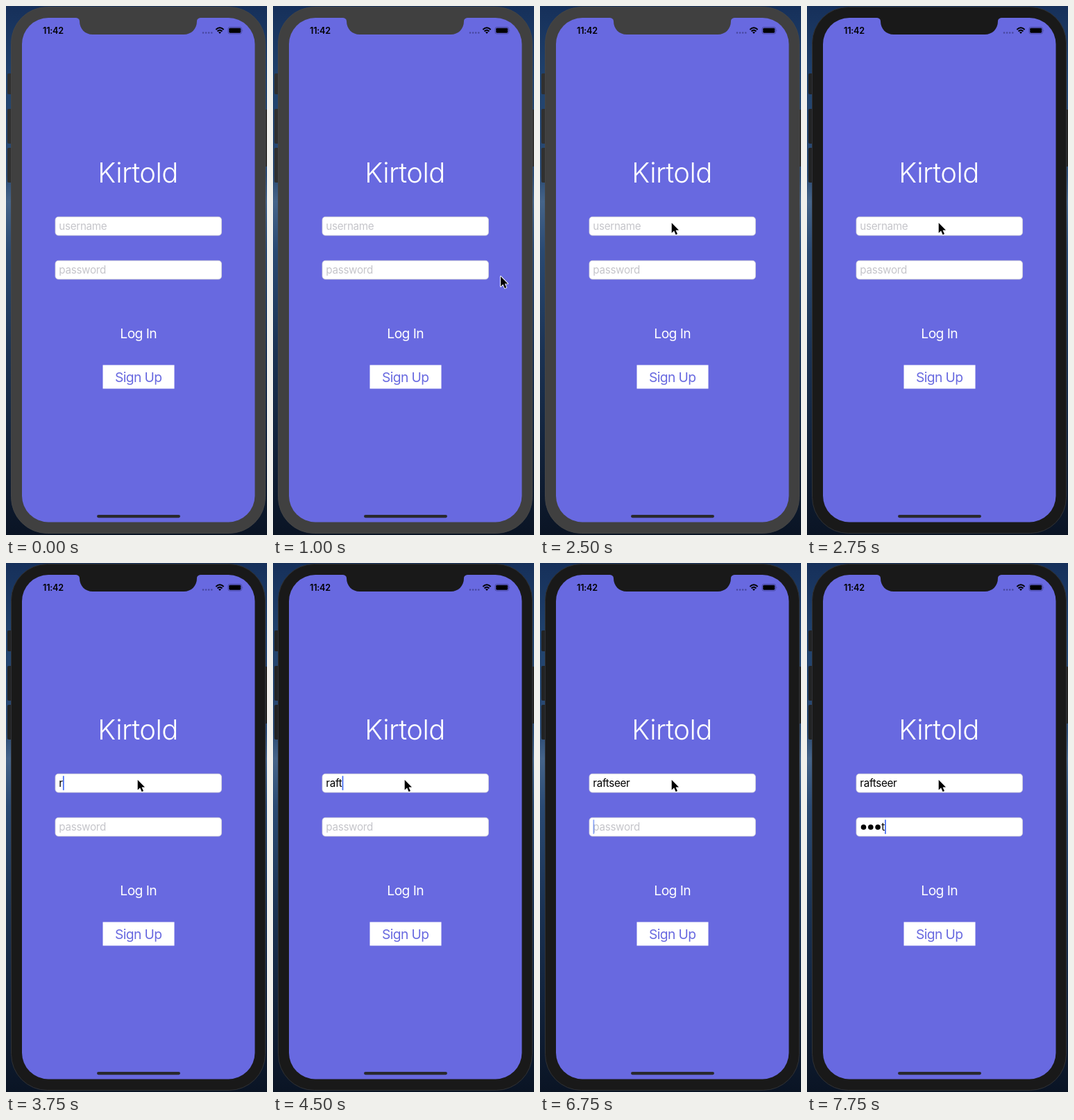
Write an HTML page that moves like this. It is 376x761 px and loops after 8 s.

```html
<!DOCTYPE html>
<html lang="en">
<head>
<meta charset="utf-8">
<title>Sign-in screen</title>
<style>
  html, body { margin: 0; width: 100%; height: 100%; overflow: hidden; background: #14233d; }
  svg { display: block; width: 376px; height: 761px; --case: #404040; --edge: #454545; --button: #303030; }
  svg.active { --case: #191919; --edge: #303236; --button: #222324; }
  text { font-family: Inter, Roboto, sans-serif; fill: #fff; }
  .case { fill: var(--case); }
  .body { stroke: var(--edge); }
  .button { fill: var(--button); }
  .title { font-size: 40px; font-weight: 300; letter-spacing: -.6px; }
  .action { font-size: 19.3px; letter-spacing: -.6px; }
  .box { fill: #fff; stroke: #cfcfd6; stroke-width: .8; }
  .input { font-size: 15.2px; letter-spacing: -.3px; fill: #000; }
  .input.hint { fill: #c5c5ca; }
  .clock { font-size: 12.6px; font-weight: 600; letter-spacing: -.2px; fill: #000; }
</style>
</head>
<body>
<svg id="stage" viewBox="0 0 376 761">
  <defs>
    <linearGradient id="sea" x2="0" y2="1">
      <stop offset="0" stop-color="#16305a"/>
      <stop offset=".14" stop-color="#20426d"/>
      <stop offset=".32" stop-color="#2b4a72"/>
      <stop offset=".37" stop-color="#456489"/>
      <stop offset=".46" stop-color="#2a4a73"/>
      <stop offset=".65" stop-color="#1b3354"/>
      <stop offset="1" stop-color="#0a1424"/>
    </linearGradient>
  </defs>
  <rect width="376" height="761" fill="url(#sea)"/>

  <g class="button">
    <rect x="2" y="97" width="8" height="30" rx="2"/>
    <rect x="2" y="148" width="8" height="50" rx="2"/>
    <rect x="2" y="204" width="8" height="50" rx="2"/>
    <rect x="370" y="149" width="6" height="82" rx="1"/>
  </g>
  <rect class="case body" x="7.5" y="1.5" width="366" height="757" rx="52"/>
  <rect x="23" y="17" width="335.5" height="725.5" rx="38" fill="#6869e0"/>
  <path class="case" d="M99 16V17C104 17 106 19 106 22C106 33 114 41 125 41H256C267 41 275 33 275 22C275 19 277 17 282 17V16Z"/>

  <text class="clock" x="53" y="39.6">11:42</text>
  <path d="M284 38.5H297" stroke="#4848a0" stroke-width="2.6" stroke-linecap="round" stroke-dasharray="0 4.1"/>
  <g fill="none" stroke="#000" stroke-width="2">
    <path d="M302.4 34Q308 28.6 313.6 34M304.6 36.4Q308 33.2 311.4 36.4"/>
    <path d="M306 37.8Q308 36.4 310 37.8L308 40Z" fill="#000" stroke="none"/>
  </g>
  <rect x="320" y="30.5" width="19.5" height="9.5" rx="2.4" fill="none" stroke="#4747a0" stroke-width=".9"/>
  <rect x="321.3" y="31.8" width="16.9" height="6.9" rx="1.4"/>
  <path d="M340.6 33.8Q342 35.2 340.6 36.7Z" fill="#4747a0"/>

  <g text-anchor="middle">
    <text class="title" x="190" y="253.5">Kirtold</text>
    <text class="action" x="190.7" y="478">Log In</text>
    <rect x="139.5" y="516.5" width="103" height="34" fill="#fff"/>
    <text class="action" x="190.7" y="540.5" style="fill:#6869e0">Sign Up</text>
  </g>

  <rect class="box" x="71" y="303.3" width="239.5" height="26.8" rx="4.5"/>
  <rect class="box" x="71" y="366.3" width="239.5" height="26.8" rx="4.5"/>
  <text class="input" id="user" x="76.3" y="322"></text>
  <path id="dots" d="M81.5 380H106" stroke="#000" stroke-width="7.6" stroke-linecap="round"/>
  <text class="input" id="pass" y="385"></text>
  <rect id="caret" width="1.7" height="20.5" fill="#426bf2"/>

  <rect x="131" y="732" width="120" height="4.2" rx="2.1" fill="#29292e"/>
  <path id="pointer" d="M0 0V14.5L3.4 11.3L5.9 17L8.3 16L5.8 10.4H10.3Z"
        stroke="#fff" stroke-width="1.8" stroke-linejoin="round" paint-order="stroke"/>
</svg>
<script>
  const LOOP = 8000, LEFT = 76.3, DOT_STEP = 10.3;
  const [stage, user, dots, pass, caret, pointer] =
    ["stage", "user", "dots", "pass", "caret", "pointer"].map(id => document.getElementById(id));

  const name = "raftseer", secret = "test";
  const nameTimes = [3750, 4000, 4250, 4500, 5000, 5250, 5500, 5750];
  const secretTimes = [7000, 7250, 7500, 7750];

  // Pointer tip: start time, x, y
  const stops = [
    [1000, 328, 389], [1250, 287, 389], [1500, 197, 338], [1750, 197, 302],
    [2000, 197, 302.6], [2250, 189.3, 311.4], [2500, 189.7, 312]
  ];

  const typed = (times, t) => times.filter(time => time <= t).length;
  const place = (el, x, y) => el.setAttribute("transform", `translate(${x} ${y})`);
  const show = (el, visible) => el.setAttribute("visibility", visible ? "visible" : "hidden");

  function setInput(el, value, hint) {
    el.textContent = value || hint;
    el.classList.toggle("hint", !value);
    return value ? el.getComputedTextLength() : 0;
  }

  function draw(t) {
    stage.classList.toggle("active", t >= 2750);

    const stop = stops.filter(s => s[0] <= t).pop();
    show(pointer, stop);
    if (stop) place(pointer, stop[1], stop[2]);

    const userWidth = setInput(user, name.slice(0, typed(nameTimes, t)), "username");

    // Only the newest secret letter is readable
    const count = typed(secretTimes, t), hidden = Math.max(0, count - 1);
    const passX = LEFT + hidden * DOT_STEP;
    pass.setAttribute("x", passX);
    const passWidth = setInput(pass, count ? secret[hidden] : "", "password");
    show(dots, hidden);
    dots.setAttribute("stroke-dasharray", `0 ${DOT_STEP} `.repeat(hidden) + "0 99");
    dots.setAttribute("d", `M81.5 380h${Math.max(0.1, (hidden - 0.5) * DOT_STEP)}`);

    show(caret, t >= 3000);
    if (t < 6250) place(caret, LEFT + userWidth + 0.2, 306.3);
    else place(caret, passX + passWidth + 0.2, 369.3);
    caret.setAttribute("opacity", t >= 6750 && t < 7000 ? 0.6 : 1);
  }

  const start = performance.now();
  function tick() {
    draw((performance.now() - start) % LOOP);
    requestAnimationFrame(tick);
  }
  tick();
</script>
</body>
</html>
```
